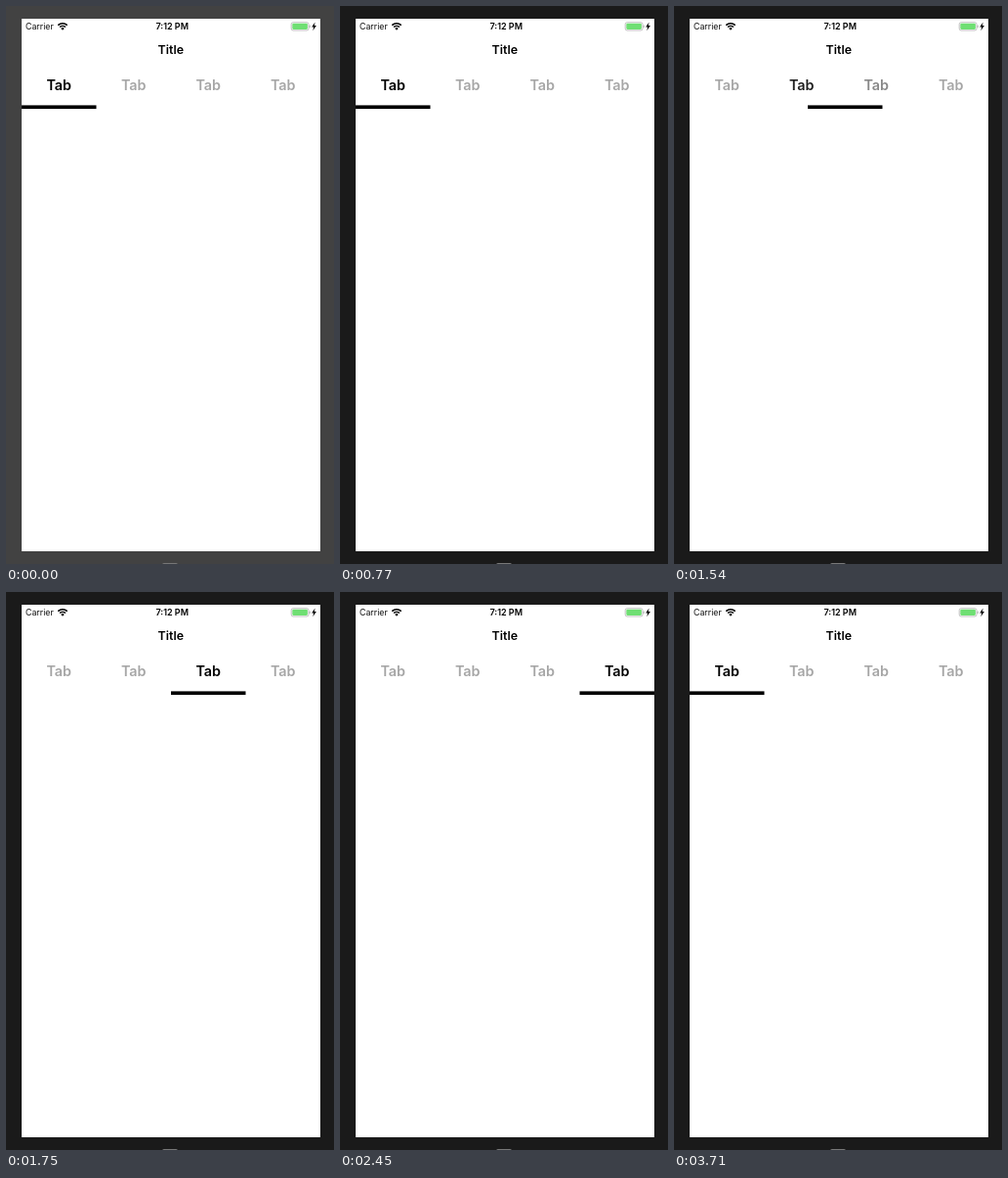
An HTML page with a canvas that plays this animation: 336x570 px, repeating every 4.27 s.

```html
<!DOCTYPE html>
<html lang="en">
<head>
<meta charset="utf-8">
<title>Tabs</title>
<style>
html, body { margin: 0; width: 100%; height: 100%; overflow: hidden; background: #424242; }
canvas { display: block; width: 336px; height: 570px; }
</style>
</head>
<body>
<canvas id="stage"></canvas>
<script>
const W = 336, H = 570, LOOP = 4270, STEP = 70;
const PAGE = { x: 16, y: 13, w: 306, h: 544 };
const TAB_W = PAGE.w / 4;
const MOVES = [
  { from: 0, to: 1, start: 825, time: 360 },
  { from: 1, to: 2, start: 1495, time: 250 },
  { from: 2, to: 3, start: 2195, time: 250 },
  { from: 3, to: 0, start: 3390, time: 310 }
];

const canvas = document.getElementById('stage');
const c = canvas.getContext('2d');
const ratio = window.devicePixelRatio || 1;
canvas.width = W * ratio;
canvas.height = H * ratio;
c.scale(ratio, ratio);

const clamp = v => Math.max(0, Math.min(1, v));

// Ease out with a slight overshoot
function spring(u) {
  const s = 1.1, v = u - 1;
  return 1 + (s + 1) * v ** 3 + s * v ** 2;
}

function text(str, x, y, size, weight, color, align = 'center') {
  c.font = `${weight} ${size}px Inter, "Liberation Sans", sans-serif`;
  c.textAlign = align;
  c.fillStyle = color;
  c.fillText(str, x, y);
}

function roundBox(x, y, w, h, r) {
  c.beginPath();
  c.roundRect(x, y, w, h, r);
}

function wifi(x, y) {
  const spread = Math.PI * 0.24, up = -Math.PI / 2;
  c.strokeStyle = c.fillStyle = '#000';
  c.lineWidth = 1.5;
  for (const r of [4.3, 6.9]) {
    c.beginPath();
    c.arc(x, y, r, up - spread, up + spread);
    c.stroke();
  }
  c.beginPath();
  c.moveTo(x, y);
  c.arc(x, y, 2.5, up - spread, up + spread);
  c.fill();
}

function battery() {
  c.strokeStyle = '#a8a8a8';
  c.lineWidth = 0.7;
  roundBox(292.2, 16.7, 17.8, 8.3, 2);
  c.stroke();
  c.fillStyle = '#6fdf73';
  roundBox(293.3, 17.8, 15.6, 6.1, 1.1);
  c.fill();
  c.fillStyle = '#a8a8a8';
  roundBox(310.6, 19.4, 1, 2.9, 0.5);
  c.fill();

  c.fillStyle = '#000';
  c.beginPath();
  [[316.6, 16.5], [313.2, 21.5], [315.2, 21.5], [314.3, 25.2], [317.9, 20.1], [315.8, 20.1]]
    .forEach(([x, y]) => c.lineTo(x, y));
  c.fill();
}

function tabState(t) {
  const move = MOVES.filter(m => t >= m.start).pop();
  if (!move) return { pos: 0, from: 0, to: 0, mix: 1 };
  const u = clamp((t - move.start) / move.time);
  return {
    pos: move.from + (move.to - move.from) * spring(u),
    from: move.from, to: move.to, mix: u
  };
}

function draw(t) {
  const { pos, from, to, mix } = tabState(t);

  c.fillStyle = t < 770 ? '#424242' : '#1a1a1a';
  c.fillRect(0, 0, W, H);
  c.fillStyle = '#777';
  roundBox(160, 569, 16, 4, 2);
  c.fill();

  c.save();
  c.beginPath();
  c.rect(PAGE.x, PAGE.y, PAGE.w, PAGE.h);
  c.clip();
  c.fillStyle = '#fff';
  c.fillRect(PAGE.x, PAGE.y, PAGE.w, PAGE.h);

  text('Carrier', 20, 24.3, 8.8, 400, '#111', 'left');
  wifi(58, 24.7);
  text('7:12 PM', 170.2, 24.3, 9, 600, '#000');
  battery();
  text('Title', 168.8, 49, 12.4, 600, '#000');

  for (let i = 0; i < 4; i++) {
    const dark = i === to ? mix : i === from ? 1 - mix : 0;
    const grey = Math.round(166 * (1 - dark));
    text('Tab', PAGE.x + TAB_W * (i + 0.5), 86.4, 14.4, 600, `rgb(${grey},${grey},${grey})`);
  }

  c.fillStyle = '#000';
  c.fillRect(PAGE.x + pos * TAB_W, 101.4, TAB_W, 3.7);
  c.restore();
}

const begin = performance.now();
function frame() {
  const t = (performance.now() - begin) % LOOP;
  draw(Math.floor(t / STEP) * STEP);
  requestAnimationFrame(frame);
}
frame();
</script>
</body>
</html>
```
